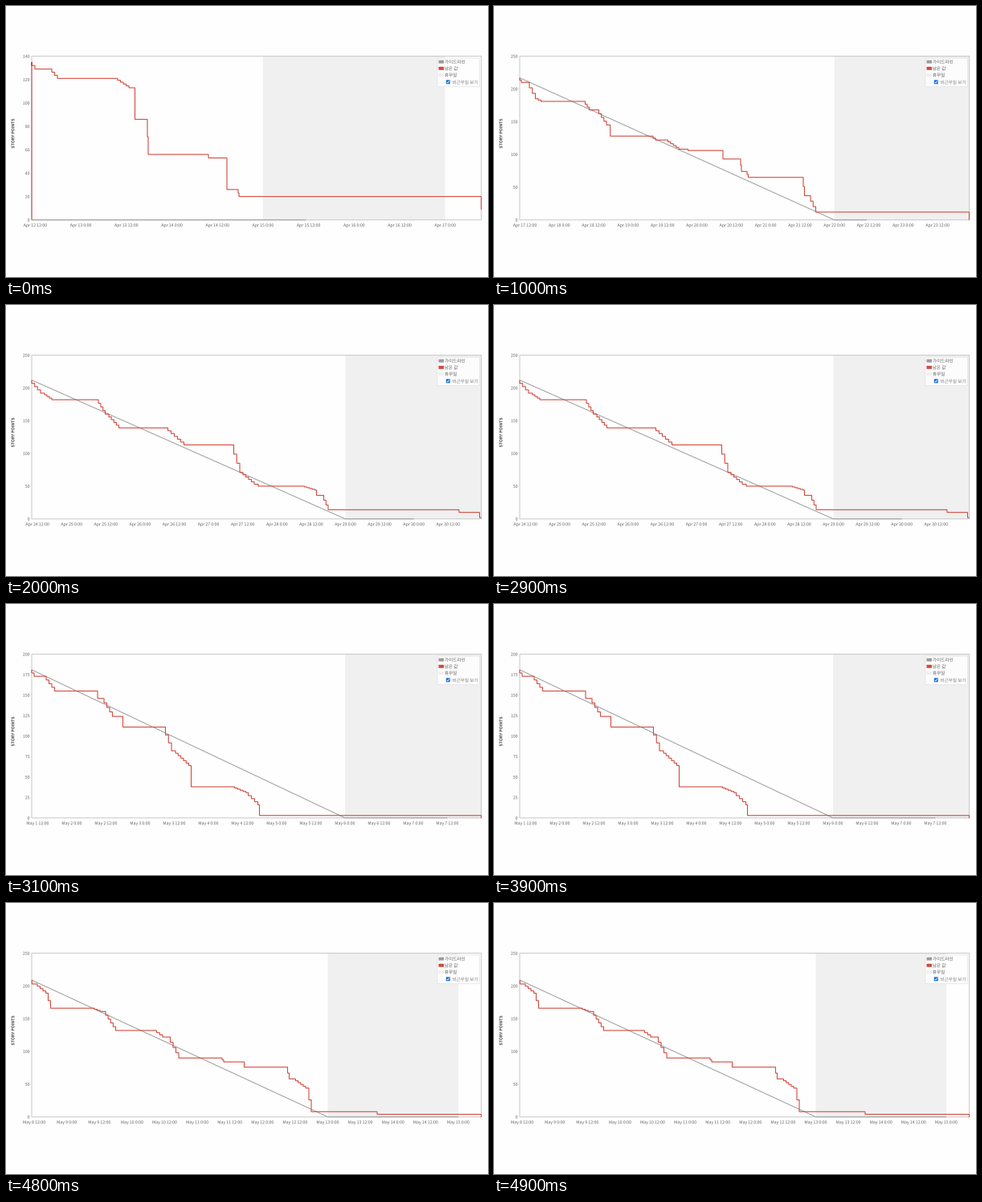
Animation of 600 by 338 pixels, one loop 5.1 s. Source, as a matplotlib script:

```python
import numpy as np
import matplotlib.pyplot as plt
from matplotlib.animation import FuncAnimation
from matplotlib.patches import PathPatch, Rectangle
from matplotlib.textpath import TextPath
from matplotlib.transforms import Affine2D

W, H, DPI = 600, 338, 64
PX = 72 / DPI                      # points per pixel
LEFT, RIGHT, TOP, BOTTOM = 32, 591.7, 62.6, 266.8
RED, GUIDE, SHADE, LABEL = "#d04a3e", "#9c9c9c", "#f0f0f0", "#606060"
INTERVAL, LOOP = 100, 5100

plt.rcParams["font.family"] = "Noto Sans CJK JP"

# weekend: x where the days off begin; half: width of half a day;
# work / idle: half days before the weekend / of guideline after it.
# bursts: (x, span, remaining), work finished evenly over the span.
CHARTS = [
    dict(start=0, top=140, tick=20, month="Apr", day=12, weekend=319.8, half=56.7,
         work=5, idle=0.94, total=135, guide=0,
         bursts=[(32, 4, 129), (57, 7, 121), (139, 14, 113), (160.5, 0, 86), (176, 1, 56),
                 (252, 0, 53), (275, 0, 26), (289, 1, 20), (591.5, 0, 9)]),
    dict(start=1000, top=250, tick=50, month="Apr", day=17, weekend=423.6, half=42.8,
         work=9, idle=0.94, total=217, guide=217,
         bursts=[(32, 2, 210), (44, 7.5, 185), (55, 3.5, 181), (113.5, 5, 168),
                 (130.5, 9.5, 145), (144.7, 0, 128), (198, 3, 122), (216.5, 13.5, 108),
                 (241.5, 0, 106), (285, 0, 93), (307, 1, 74), (315, 1.5, 65),
                 (385, 1.5, 37), (394, 6.5, 12), (591.5, 0, 0)]),
    dict(start=2000, top=250, tick=50, month="Apr", day=24, weekend=422.4, half=42.6,
         work=9, idle=2, total=212, guide=212,
         bursts=[(32, 11, 192), (48, 9, 182), (115, 8.5, 160), (128, 12.5, 139),
                 (201.5, 20, 113), (283.5, 7.5, 71), (295, 14, 53), (314, 0, 50),
                 (371.5, 13, 44), (386.5, 0, 36), (395.5, 5.5, 14), (564, 0, 10),
                 (589.5, 0, 2)]),
    dict(start=3100, top=200, tick=25, month="May", day=1, weekend=422, half=42.5,
         work=9, idle=3, total=181, guide=181,
         bursts=[(32, 3, 173), (50, 10.5, 155), (114, 0, 146), (122, 10.5, 124),
                 (145.5, 0, 111), (198.5, 7.5, 82), (211, 16.5, 64), (230.5, 0, 38),
                 (284.5, 14, 31), (301.5, 12, 16), (315.5, 0, 3), (591.5, 0, 0)]),
    dict(start=4100, top=250, tick=50, month="May", day=8, weekend=400.6, half=40.6,
         work=9, idle=4, total=209, guide=209,
         bursts=[(32.3, 0, 203), (39, 10.5, 189), (52.5, 3, 166), (110, 7, 161),
                 (124, 12.5, 132), (187.5, 7.5, 122), (204.5, 10.5, 90), (269, 2, 84),
                 (296.5, 0, 76), (350.5, 2, 58), (360.5, 12.5, 44), (377, 3, 8),
                 (462, 0, 4), (591.5, 0, 0)]),
]

fig = plt.figure(figsize=(W / DPI, H / DPI), dpi=DPI, facecolor="#fefefe")
ax = fig.add_axes([0, 0, 1, 1])
ax.set(xlim=(0, W), ylim=(H, 0))
ax.axis("off")


def text(x, y, s, size=5.2, color=LABEL, align=0.0, angle=0, weight="normal"):
    """Outline text on baseline y; align 0, 0.5 or 1 puts x at its left, middle or right."""
    path = TextPath((0, 0), s, size=size, prop={"weight": weight})
    box = path.get_extents()
    place = (Affine2D().translate(-box.x0 - align * box.width, 0).scale(1, -1)
             .rotate_deg(angle).translate(x, y))
    return ax.add_patch(PathPatch(place.transform_path(path), fc=color, lw=0,
                                  zorder=6, snap=False))


def rect(x0, y0, x1, y1, fill, z, edge="none", width=0.0, alpha=None):
    return ax.add_patch(Rectangle((x0, y0), x1 - x0, y1 - y0, facecolor=fill, edgecolor=edge,
                                  linewidth=width * PX, zorder=z, alpha=alpha, snap=False))


def line(points, color, width, z):
    xs, ys = zip(*points)
    return ax.plot(xs, ys, color=color, lw=width * PX, zorder=z, snap=False,
                   solid_joinstyle="miter", solid_capstyle="butt")[0]


def burndown(total, bursts):
    """Stairs that fall in equal steps about four pixels apart within each burst."""
    points, value = [(LEFT, total)], total
    for x, span, remaining in bursts:
        count = 1 + int(np.ceil(span / 4))
        levels = np.linspace(value, remaining, count + 1)
        for riser, above, below in zip(np.linspace(x, x + span, count), levels, levels[1:]):
            points += [(riser, above), (riser, below)]
        value = remaining
    return points + [(RIGHT, value)]


def build_chart(c):
    def to_px(points):
        return [(x, BOTTOM - v * (BOTTOM - TOP) / c["top"]) for x, v in points]

    weekend, half = c["weekend"], c["half"]
    stairs = burndown(c["total"], c["bursts"])
    if not c["guide"]:
        stairs.insert(0, (LEFT, 0))
    guide = [(LEFT, c["guide"]), (weekend, 0), (weekend + c["idle"] * half, 0)]
    parts = [rect(weekend, TOP, min(weekend + 4 * half, RIGHT), BOTTOM, SHADE, 1),
             line(to_px(guide), GUIDE, 1.0, 3),
             line(to_px(stairs), RED, 1.1, 4)]

    for v in range(0, c["top"] + 1, c["tick"]):
        y = to_px([(0, v)])[0][1]
        parts.append(text(29.3, y + 2, str(v), align=1))
    for i, x in enumerate(np.arange(weekend - c["work"] * half, RIGHT - 5, half)):
        day, hour = c["day"] + (i + 1) // 2, "0:00" if i % 2 else "12:00"
        parts.append(text(x, 275.2, f"{c['month']} {day} {hour}", align=0.5))
    return parts


def build_static():
    rect(LEFT, TOP, RIGHT, BOTTOM, "none", 2, "#c8c8c8", 1)
    text(10.4, 159, "STORY POINTS", 5.1, "#444444", align=0.5, angle=-90, weight="bold")
    rect(537, 65, 589.5, 100.7, "white", 5, "#dddddd", 0.7, alpha=0.85)
    for i, (name, color) in enumerate([("가이드라인", GUIDE), ("남은 값", RED), ("휴무일", SHADE)]):
        y = 69.6 + 8.2 * i
        rect(538.5, y - 2, 545, y + 2, color, 6)
        text(546.2, y + 2.1, name, 5.6, LABEL)
    rect(547.8, 92.3, 552.8, 97.3, "#1a6fd8", 6)
    line([(548.8, 94.9), (549.9, 96), (551.9, 93.5)], "white", 0.8, 7)
    text(556, 97.2, "비근무일 보기", 5.6, "#808080")


build_static()
charts = [build_chart(c) for c in CHARTS]


def update(frame):
    now = frame * INTERVAL
    current = max(i for i, c in enumerate(CHARTS) if c["start"] <= now)
    for i, parts in enumerate(charts):
        for part in parts:
            part.set_visible(i == current)
    return [p for parts in charts for p in parts]


anim = FuncAnimation(fig, update, frames=LOOP // INTERVAL, interval=INTERVAL,
                     repeat=True, repeat_delay=0, blit=False)
plt.show()
```
